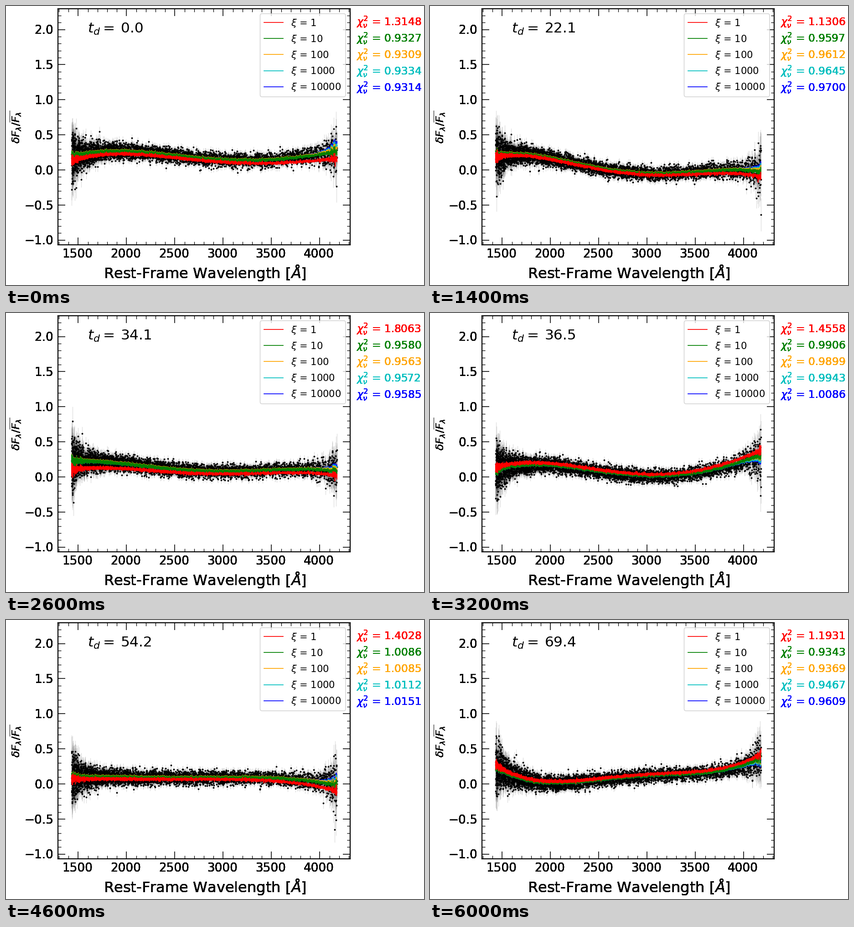
These frames come from a looping animation (917x611 px, 6200 ms). A matplotlib script:

```python
import numpy as np
import matplotlib.pyplot as plt
from matplotlib.animation import FuncAnimation
from matplotlib.collections import LineCollection
from matplotlib.patches import FancyBboxPatch
from matplotlib.ticker import MultipleLocator

W, H, DPI = 917, 611, 100
FRAMES, STEP = 31, 200
PX = 72 / DPI  # points per pixel

plt.rcParams["font.family"] = "DejaVu Sans"
plt.rcParams["mathtext.fontset"] = "dejavusans"

COLORS = ["red", "green", "orange", "c", "blue"]
KNOTS = [0, 0.2, 0.5, 0.8, 1]

# frame, delay | flux at the knots | red gap at both ends | chi-squared labels
EPOCHS = np.array([
    [0, 0.0, .18, .265, .165, .16, .26, -.05, -.10, 1.3148, .9327, .9309, .9334, .9314],
    [3, 9.2, .42, .16, -.02, -.04, -.18, -.19, -.06, 2.4135, .9590, .9590, .9593, .9594],
    [7, 22.1, .20, .175, -.03, -.015, -.03, -.02, -.07, 1.1306, .9597, .9612, .9645, .9700],
    [13, 34.1, .22, .185, .085, .105, .08, -.12, -.06, 1.8063, .9580, .9563, .9572, .9585],
    [16, 36.5, .10, .17, .035, .09, .32, .035, .06, 1.4558, .9906, .9899, .9943, 1.0086],
    [23, 54.2, .10, .095, .09, .075, -.02, -.03, -.08, 1.4028, 1.0086, 1.0085, 1.0112, 1.0151],
    [30, 69.4, .25, .02, .10, .165, .38, .025, .05, 1.1931, .9343, .9369, .9467, .9609],
])

# Log-spaced spectrum; scatter and model ripple grow towards both ends
wave = 10 ** np.arange(np.log10(1432), np.log10(4178), 1e-4)
left, right = wave - wave[0], wave[-1] - wave
u = left / left[-1]
sigma = (0.049 + 0.11 * np.exp(-left / 40) + 0.08 * np.exp(-left / 200)
         + 0.13 * np.exp(-right / 50) + 0.06 * np.exp(-right / 150))
ripple = 0.011 + 0.03 * np.exp(-left / 60) + 0.03 * np.exp(-right / 50)


def spectrum(shape, gap):
    """Base flux and the five model curves."""
    base = np.polyval(np.polyfit(KNOTS, shape, 4), u)
    red = base + (gap[0] * (1 - u) + gap[1] * u) * (1 - 2.3 * u * (1 - u))
    drift = -1.2 * gap[1] * np.exp(-right / 110)
    return base, [red, base, base + 0.3 * drift + 0.005,
                  base + 0.7 * drift, base + drift]


fig = plt.figure(figsize=(W / DPI, H / DPI), dpi=DPI, facecolor="white")

# Plot area
L, R, T, B = 114, 755, 6, 523
ax = fig.add_axes([L / W, 1 - B / H, (R - L) / W, (B - T) / H])
ax.set_xlim(1291, 4314)
ax.set_ylim(-1.066, 2.296)
ax.xaxis.set_major_locator(MultipleLocator(500))
ax.xaxis.set_minor_locator(MultipleLocator(100))
ax.yaxis.set_major_locator(MultipleLocator(0.5))
ax.yaxis.set_minor_locator(MultipleLocator(0.1))
ax.tick_params(which="both", direction="in", top=True, right=True,
               labelbottom=False, labelleft=False)
ax.tick_params(which="major", length=16 * PX, width=1.6 * PX)
ax.tick_params(which="minor", length=7 * PX, width=1.3 * PX)
for spine in ax.spines.values():
    spine.set_linewidth(2.2 * PX)

bars = LineCollection([], colors="black", alpha=0.12, linewidths=1.4 * PX, zorder=1)
ax.add_collection(bars)
dots, = ax.plot([], [], "o", color="black", ms=3.8 * PX, mew=0, zorder=2)
models = [ax.plot([], [], color=c, lw=1.7 * PX, zorder=8 - n)[0]
          for n, c in enumerate(COLORS)]

# Overlay in pixel coordinates
top = fig.add_axes([0, 0, 1, 1])
top.set_xlim(0, W)
top.set_ylim(H, 0)
top.axis("off")


def text(x, y, s, size, **kw):
    kw.setdefault("va", "baseline")
    return top.text(x, y, s, fontsize=size * PX, **kw)


def heavy(*args, **kw):
    """Overprinted text with hard, dark edges."""
    return [text(*args, **kw) for _ in range(8)]


for n in range(6):
    heavy(156.3 + 106 * n, 551, str(1500 + 500 * n), 26.2, ha="center")
for n in range(7):
    label = f"{2 - n / 2:.1f}".replace("-", "\u2212")
    heavy(104.3, 61 + 76.9 * n, label, 26.2, ha="right")
heavy(436, 596, r"Rest-Frame Wavelength [$\AA$]", 32.1, ha="center")
heavy(22, 265, r"$\delta F_{\lambda}/\overline{F_{\lambda}}$", 23.5,
      ha="center", va="center", rotation=90)

text(179, 58.5, r"$t_d =$", 31.3)
delay = text(251.5, 58.5, "", 31.3)

# Legend and scores
top.add_patch(FancyBboxPatch((557.5, 16.8), 187.5, 182,
                             boxstyle="round,pad=0,rounding_size=4.2",
                             fc="white", ec="0.8", alpha=0.8, lw=1.7 * PX))
scores = []
for n, c in enumerate(COLORS):
    y = 36.2 + 35.1 * n
    top.plot([566, 608], [y, y], color=c, lw=1.7 * PX)
    text(624.8, y + 7.4, rf"$\xi$ = {10 ** n}", 21)
    scores.append(heavy(767.5, 42 + 36 * n, "", 23.4, color=c))


def draw(i):
    rng = np.random.default_rng(100 + i)
    now = [np.interp(i, EPOCHS[:, 0], column) for column in EPOCHS.T]
    base, curves = spectrum(now[2:7], now[7:9])

    noise = ripple * rng.standard_normal(wave.size)
    for line, curve in zip(models, curves):
        line.set_data(wave, curve + noise)

    flux = base + sigma * rng.standard_normal(wave.size)
    dots.set_data(wave, flux)
    bars.set_segments(np.stack([np.column_stack([wave, flux - sigma]),
                                np.column_stack([wave, flux + sigma])], axis=1))

    delay.set_text(f"{now[1]:.1f}")
    for copies, chi in zip(scores, now[9:]):
        for t in copies:
            t.set_text(rf"$\chi^2_\nu$ = {chi:.4f}")
    return [bars, dots, *models, delay]


anim = FuncAnimation(fig, draw, frames=FRAMES, interval=STEP, repeat=True, blit=False)
plt.show()
```
